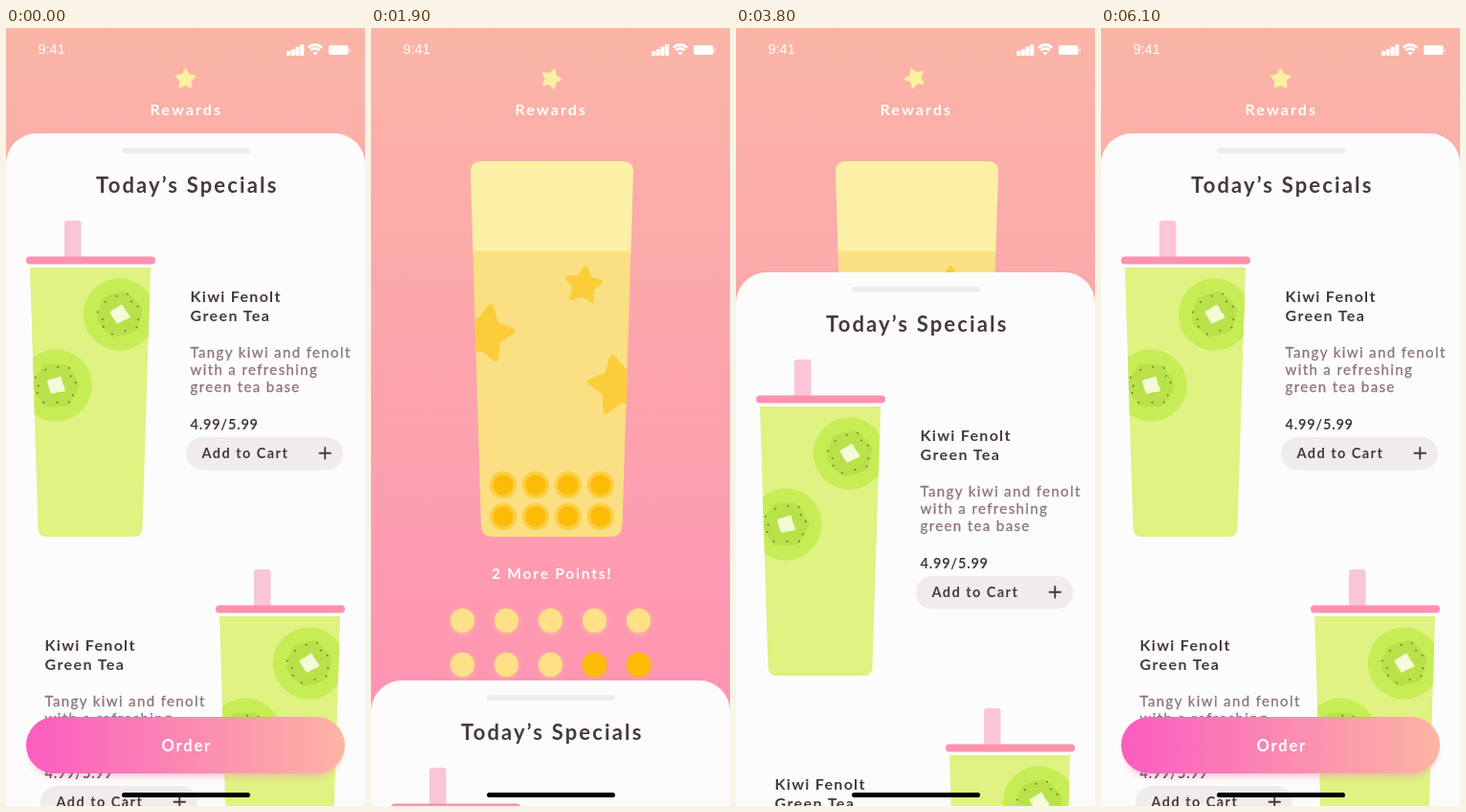
These frames come from a looping animation (375 by 812 pixels, 7 s). An HTML page:

```html
<!DOCTYPE html>
<html lang="en">
<head>
<meta charset="utf-8">
<title>Rewards</title>
<style>
html, body { margin: 0; width: 100%; height: 100%; overflow: hidden; }
svg { display: block; width: 375px; height: 812px; }
text { font-family: Lato, "Open Sans", sans-serif; font-weight: 700; fill: #463a3d; white-space: pre; }
.light { fill: #fff; }
.desc { font-weight: 400; fill: #8d7579; stroke: #8d7579; stroke-width: .3px; }
.clock { font-family: "Liberation Sans", Arial, sans-serif; font-weight: 400; fill: #fff; }
</style>
</head>
<body>
<svg viewBox="0 0 375 812">
  <defs>
    <linearGradient id="sky" x1="0" y1="0" x2="0" y2="1">
      <stop offset="0" stop-color="#fab5a6"/><stop offset="1" stop-color="#ff8fb5"/>
    </linearGradient>
    <linearGradient id="cta" x1="0" y1="0" x2="1" y2="0">
      <stop offset="0" stop-color="#fa5cc0"/><stop offset="1" stop-color="#fdb5a4"/>
    </linearGradient>
    <filter id="soft" x="-30%" y="-50%" width="160%" height="220%"><feGaussianBlur stdDeviation="3"/></filter>
    <clipPath id="glass"><path d="M116 139H262Q274.500 139 274 151L262.500 519Q262 531 250 531H127Q115.500 531 115 519L104 151Q103.500 139 116 139Z"/></clipPath>
    <clipPath id="cup"><path d="M25 250H151L142.500 522Q142 531 134 531H42Q34 531 33.500 522Z"/></clipPath>
  </defs>

  <rect width="375" height="812" fill="url(#sky)"/>
  <text class="clock" x="33.500" y="27" font-size="14.500">9:41</text>
  <g fill="#fff">
    <rect x="293" y="24" width="4.200" height="5" rx="1"/>
    <rect x="297.700" y="22" width="4.200" height="7" rx="1"/>
    <rect x="302.400" y="19.500" width="4.200" height="9.500" rx="1"/>
    <rect x="307.100" y="17" width="4.200" height="12" rx="1"/>
    <rect x="337" y="18" width="20.500" height="10" rx="2.500"/>
    <rect x="358.500" y="21.300" width="1.300" height="3.500" rx=".6" opacity=".6"/>
    <path d="M323 28.500L320.300 25.700Q323 23.600 325.700 25.700Z"/>
  </g>
  <path d="M318.300 23.300Q323 19.500 327.700 23.300M315.800 20.500Q323 14.500 330.200 20.500" fill="none" stroke="#fff" stroke-width="2.700"/>

  <g id="badge"></g>
  <text class="light" x="150.500" y="91" font-size="16" letter-spacing="2.100">Rewards</text>

  <g clip-path="url(#glass)">
    <rect x="100" y="139" width="180" height="95" fill="#fbf0a6"/>
    <rect x="100" y="233" width="180" height="300" fill="#fbdf83"/>
    <g id="toppings"></g>
  </g>
  <text class="light" x="126" y="575" font-size="15.500" letter-spacing="1.800">2 More Points!</text>
  <g id="points"></g>

  <g id="sheet">
    <path d="M0 1500V142A32 32 0 0 1 32 110H343A32 32 0 0 1 375 142V1500Z" fill="#fcfcfc"/>
    <rect x="121" y="125" width="134" height="6" rx="3" fill="#eeecec"/>
    <text x="94" y="172" font-size="22" letter-spacing="2.150">Today’s Specials</text>
    <g id="menu"></g>
    <rect x="24" y="725" width="327" height="57" rx="28" fill="#f490b4" opacity=".45" filter="url(#soft)"/>
    <rect x="21" y="719" width="333" height="59" rx="29.500" fill="url(#cta)"/>
    <text class="light" x="162.500" y="755" font-size="16.500" letter-spacing="1.800">Order</text>
  </g>
  <rect x="121" y="798" width="134" height="5" rx="2.500"/>
</svg>

<script>
const LOOP = 7000, STEP = 50, TRAVEL = 634;
const $ = id => document.getElementById(id);
const circle = (x, y, r, fill, extra = '') =>
  `<circle cx="${x}" cy="${y}" r="${r}" fill="${fill}" ${extra}/>`;
const label = (x, y, size, gap, str, cls = '') =>
  `<text x="${x}" y="${y}" font-size="${size}" letter-spacing="${gap}" class="${cls}">${str}</text>`;

// Closed polygon around the origin; radius is a function of the vertex index.
function ring(n, radius) {
  return Array.from({ length: n }, (_, i) => {
    const a = i / n * 2 * Math.PI, r = radius(i);
    return (r * Math.sin(a)).toFixed(2) + ',' + (-r * Math.cos(a)).toFixed(2);
  }).join(' ');
}

function blob(n, radius, color, round) {
  return `<polygon points="${ring(n, radius)}" fill="${color}" stroke="${color}" stroke-width="${round}" stroke-linejoin="round"/>`;
}

function star(x, y, r, tilt, color) {
  const round = r * 0.2, tip = r - round * 0.6;
  return `<g transform="translate(${x} ${y}) rotate(${tilt})">` +
    blob(10, i => i % 2 ? tip * 0.52 : tip, color, round) + '</g>';
}

function kiwi(x, y, turn) {
  let seeds = '';
  for (let i = 0; i < 12; i++) {
    const a = i * 2 * Math.PI / 12 + 0.15 * Math.sin(i * 5);
    const r = 20.5 + 2.5 * Math.sin(i * 2.3);
    seeds += circle((r * Math.cos(a)).toFixed(1), (r * Math.sin(a)).toFixed(1), 1, '#6f7f2c');
  }
  return `<g transform="translate(${x} ${y}) rotate(${turn})">` +
    circle(0, 0, 37.6, '#c6ed56') +
    blob(12, i => i % 2 ? 20.5 : 22.5, '#b9e14a', 4) + seeds +
    blob(8, i => i % 2 ? 5.8 : 8.6 + Math.sin(i), '#f4fbd8', 3.5) + '</g>';
}

function drink(dx, dy) {
  return `<g transform="translate(${dx} ${dy})">
    <rect x="61" y="201" width="17.500" height="42" rx="3" fill="#fac6d7"/>
    <rect x="21" y="238.500" width="135" height="8" rx="4" fill="#fd92ae"/>
    <g clip-path="url(#cup)">
      <rect x="20" y="250" width="136" height="282" fill="#dff282"/>
      ${kiwi(118.5, 299, 15)}${kiwi(52, 373, 30)}
    </g></g>`;
}

function details(dx, dy) {
  const lines = ['Tangy kiwi and fenolt', 'with a refreshing', 'green tea base'];
  return `<g transform="translate(${dx} ${dy})">` +
    label(192.5, 286, 16, 1.3, 'Kiwi Fenolt') +
    label(192.5, 306, 16, 1.4, 'Green Tea') +
    lines.map((s, i) => label(192.5, 344 + 18 * i, 15, 1.38, s, 'desc')).join('') +
    label(192.5, 418.5, 14.5, 0.8, '4.99/5.99') +
    '<rect x="188" y="427" width="164" height="34.500" rx="17.200" fill="#f1ecec"/>' +
    label(204.5, 449, 14.5, 1.45, 'Add to Cart') +
    '<path d="M327.500 443.700h11.500M333.250 438v11.500" stroke="#463a3d" stroke-width="1.900" stroke-linecap="round"/></g>';
}

function build() {
  let toppings = star(222, 268.5, 21, 7, '#fbcd3a') +
    star(119, 319, 32, 13, '#fbcd3a') + star(258, 373, 33, -11, '#fbcd3a');
  for (let i = 0; i < 8; i++) {
    const x = 138 + 33.9 * (i % 4), y = i < 4 ? 477 : 510;
    toppings += circle(x, y, 14.2, '#fccf43') + circle(x, y, 10.6, '#fcbb06');
  }
  $('toppings').innerHTML = toppings;

  let points = '';
  for (let i = 0; i < 10; i++) {
    const x = 95.5 + 46 * (i % 5), y = i < 5 ? 618.5 : 664.5;
    const color = i < 8 ? '#fde087' : '#fcbc06';
    points += circle(x, y + 2, 12.5, color, 'opacity=".4" filter="url(#soft)"') + circle(x, y, 12.7, color);
  }
  $('points').innerHTML = points;

  $('menu').innerHTML = drink(0, 0) + details(0, 0) + drink(198, 364) + details(-152, 364);
  // The star's centre sits a little below the pivot it spins around.
  $('badge').innerHTML = star(0, 0.7, 11.4, 0, '#fbf0a0');
}

// cubic-bezier(.42, 0, .58, 1), solved by bisection
function ease(p) {
  if (p <= 0) return 0;
  if (p >= 1) return 1;
  let lo = 0, hi = 1;
  for (let i = 0; i < 24; i++) {
    const s = (lo + hi) / 2, q = 1 - s;
    if (1.26 * s * q * q + 1.74 * s * s * q + s * s * s < p) lo = s; else hi = s;
  }
  return lo * lo * (3 - 2 * lo);
}

// The badge rests upright, spins at a steady rate, then snaps back.
function badgeAngle(t) {
  return t < 650 || t >= 6100 ? 0 : 270 + 0.092 * (t - 1500);
}

function render(t) {
  const drop = TRAVEL * (ease((t - 1120) / 1000) - ease((t - 3079) / 1078));
  $('sheet').setAttribute('transform', `translate(0 ${drop.toFixed(2)})`);
  $('badge').setAttribute('transform', `translate(187.600 52.700) rotate(${badgeAngle(t).toFixed(2)})`);
}

build();
render(0);
const start = performance.now();
function tick() {
  const t = (performance.now() - start) % LOOP;
  render(Math.floor(t / STEP) * STEP);
  requestAnimationFrame(tick);
}
requestAnimationFrame(tick);
</script>
</body>
</html>
```
